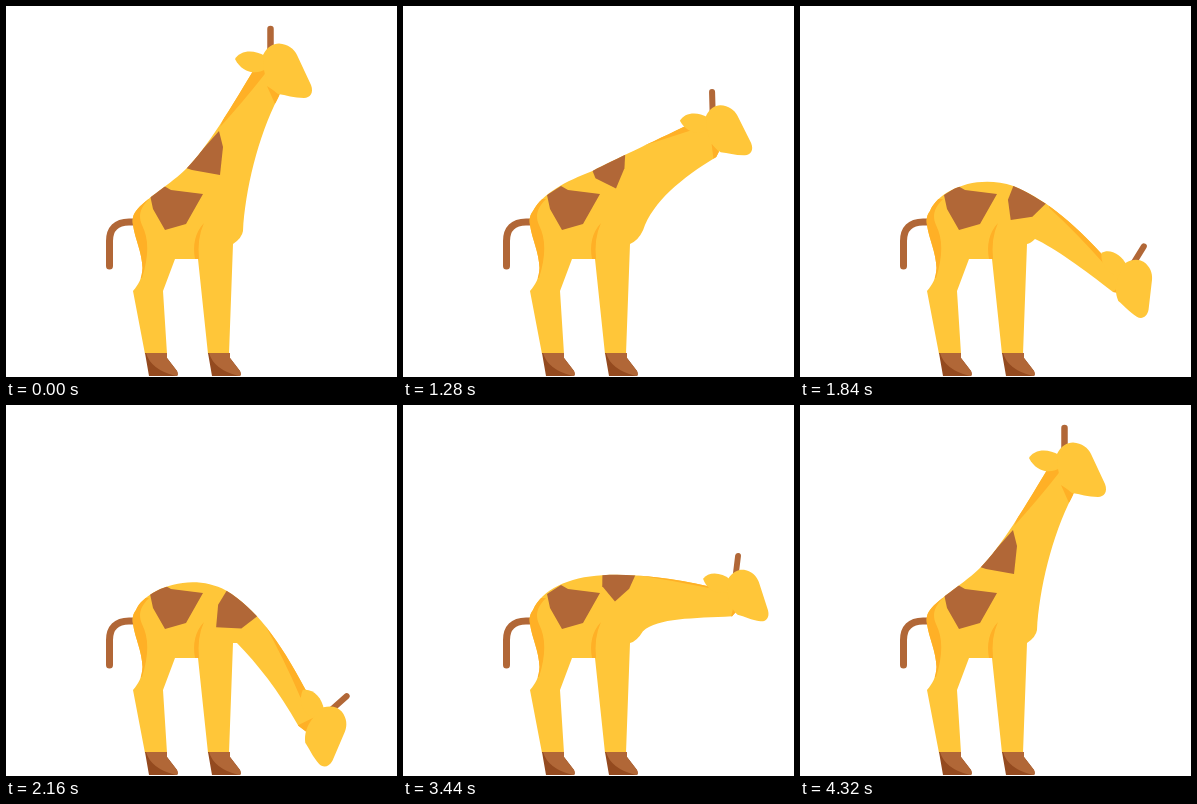
An HTML page with a canvas that plays this animation: 391x371 px, repeating every 4.56 s.

```html
<!DOCTYPE html>
<html lang="en">
<head>
<meta charset="utf-8">
<title>Grazing giraffe</title>
<style>
  html, body { margin: 0; width: 100%; height: 100%; overflow: hidden; background: #fff; }
  canvas { display: block; }
</style>
</head>
<body>
<canvas id="stage" width="391" height="371"></canvas>
<script>
const ctx = document.getElementById('stage').getContext('2d');
const YELLOW = '#ffc639', ORANGE = '#ffb026', BROWN = '#b16737', DARK = '#944a1f';
const LOOP = 4560, STEP = 80;

// [step, how far the neck is lowered]
const KEYS = [
  [0, 0], [11, 0], [12, .037], [15, .19], [18, .4], [19, .488], [24, .88], [27, .97], [31, 1],
  [36, 1], [37, .99], [40, .85], [43, .51], [46, .2], [50, .03], [54, 0], [57, 0]
];

// Each moving shape: neck raised, level and lowered.
const BODY = [
  'M130 205C139 193 165 178 181 162C202 140 222 107 256 50L282 70L272 92C252 130 239 185 237 225Q236 232 227 238',
  'M130 205C139 185 165 172 199 170C225 168 260 170 306 179L345 190L329 209C290 212 255 212 240 226Q234 236 227 238',
  'M130 205C138 186 185 165 222 187C250 205 273 238 298 292L312 350L287 328C270 290 250 262 230 239Q228 238 227 238'
];
const LEGS = 'L223 348H202L192 253H169L157 285L161 348H139L127 285C133 278 136 272 136.500 262' +
  'C136 246 129 233 127 219C126 213 127 209 130 205Z';
const NECK_SPOT = [
  'M180 162L213 125L217 141L214 169L186 164Z',
  'M199 168L232 169L226 183L212 196L199 181Z',
  'M223 186L254 213L236 226L210 224L213 201Z'
];
const NECK_SHADE = [
  'M214 121L238 62L262 64Q237 96 214 121Z',
  'M233 166L302 166L307 181Q270 174 233 169Z',
  'M259 220L304 284L292 300Q277 258 259 220Z'
];
const JAW_SHADE = [
  'M261 80L276 90L269 98Z',
  'M331 196L337 210L327 213Z',
  'M304 320L300 342L285 328Z'
];
// x, y, rotation in degrees, scale
const HEAD_POSE = ['302 91 0 1', '361 213 6.5 .9', '310 371.500 52 .96'];

const SPOT = new Path2D('M144 189L158 180L165 184L197 188L180 218L159 224L147 203Z');
const RUMP_SHADE = new Path2D('M143 193C134 202 132 210 136 219C143 233 143 250 136 272L120 272V193Z');
const LEG_SHADE = new Path2D('M198 217Q185 231 189 253H193Q191 232 198 217Z');
const TAIL = new Path2D('M130 216H123C110 216 103.500 223 103.500 235V260');
const HOOF = new Path2D('M139 347H161V352L171 365Q173 370 170 370H143Z');
const HOOF_LIGHT = new Path2D('M140 347H161V352L171 365Q173 370 170 370Q145 364 140 347Z');
const HORN = new Path2D('M264.500 23V46');
const HEAD = new Path2D('M257 49C261 41 267 37.500 273 37.500C282 38 288 43 291 49L305 79' +
  'C308 87 304 92 298 92C288 92 280 89 272 88C265 83 260 76 258 64Z');
const EAR = new Path2D('M229 53C234 44 248 43 259 50L261 62C251 70 236 67 229 53Z');

function lowered(step) {
  const secant = i => KEYS[i + 1] ? (KEYS[i + 1][1] - KEYS[i][1]) / (KEYS[i + 1][0] - KEYS[i][0]) : 0;
  const slope = i => {
    const a = i ? secant(i - 1) : 0, b = secant(i);
    return a * b > 0 ? 2 * a * b / (a + b) : 0;
  };
  const i = KEYS.findIndex((key, k) => step < KEYS[k + 1][0]);
  const [start, from] = KEYS[i], [end, to] = KEYS[i + 1];
  const span = end - start, u = (step - start) / span, v = 1 - u;
  return from * v * v * (1 + 2 * u) + to * u * u * (1 + 2 * v) +
    span * u * v * (v * slope(i) - u * slope(i + 1));
}

// Quadratic blend of the numbers in three matching strings.
function blend([up, level, down], p) {
  const number = /[\d.]+/g;
  const mid = level.match(number), low = down.match(number);
  let i = 0;
  return up.replace(number, n => {
    const value = n * (1 - p) * (1 - 2 * p) + mid[i] * 4 * p * (1 - p) + low[i] * p * (2 * p - 1);
    i++;
    return value.toFixed(3);
  });
}

function fill(color, path) {
  ctx.fillStyle = color;
  ctx.fill(path);
}

function line(path, width) {
  ctx.strokeStyle = BROWN;
  ctx.lineWidth = width;
  ctx.lineCap = 'round';
  ctx.stroke(path);
}

function drawHead(p) {
  const [x, y, angle, scale] = blend(HEAD_POSE, p).split(' ').map(Number);
  ctx.save();
  ctx.translate(x, y);
  ctx.rotate(angle * Math.PI / 180);
  ctx.scale(scale, scale);
  ctx.translate(-302, -91);
  line(HORN, 6.5);
  fill(YELLOW, EAR);
  fill(YELLOW, HEAD);
  ctx.restore();
}

function draw(time) {
  const p = lowered(Math.floor(time % LOOP / STEP));
  const shape = poses => new Path2D(blend(poses, p));
  const body = new Path2D(blend(BODY, p) + LEGS);

  ctx.fillStyle = '#fff';
  ctx.fillRect(0, 0, 391, 371);
  line(TAIL, 7);
  fill(YELLOW, body);

  ctx.save();
  ctx.clip(body);
  fill(ORANGE, RUMP_SHADE);
  fill(ORANGE, LEG_SHADE);
  fill(ORANGE, shape(NECK_SHADE));
  fill(ORANGE, shape(JAW_SHADE));
  fill(BROWN, SPOT);
  fill(BROWN, shape(NECK_SPOT));
  ctx.restore();

  for (const x of [0, 63]) {
    ctx.save();
    ctx.translate(x, 0);
    fill(DARK, HOOF);
    fill(BROWN, HOOF_LIGHT);
    ctx.restore();
  }
  drawHead(p);
}

const began = performance.now();
function tick() {
  draw(performance.now() - began);
  requestAnimationFrame(tick);
}
tick();
</script>
</body>
</html>
```
